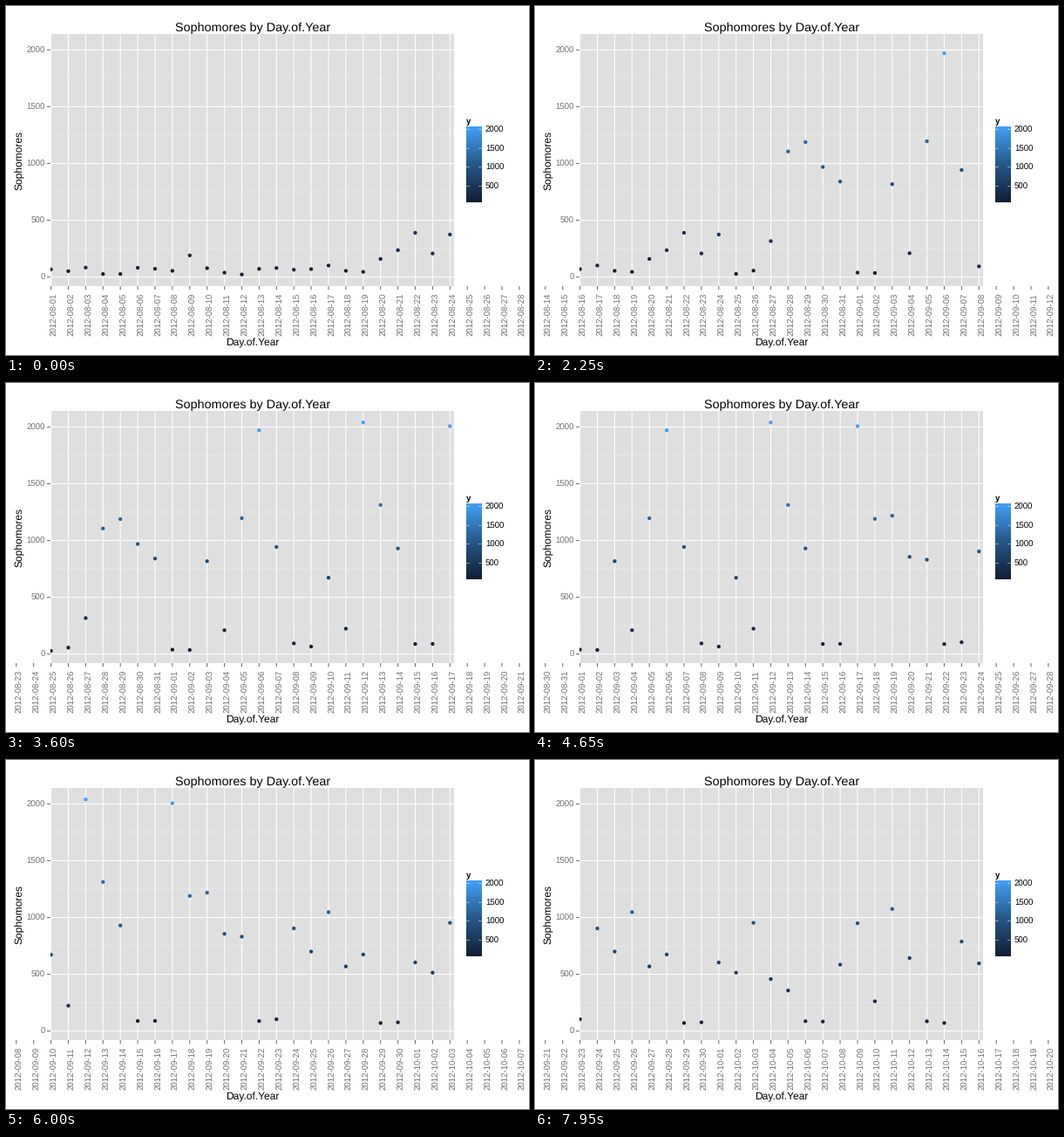
Write a matplotlib script that moves like this. It is 600 px wide and 400 px high and loops after 8000 ms.

```python
import numpy as np
import matplotlib.pyplot as plt
from matplotlib.animation import FuncAnimation
from matplotlib.colors import LinearSegmentedColormap
from matplotlib.patches import Rectangle

plt.rcParams.update({"font.family": "Liberation Sans", "text.hinting": "none"})

DPI = 100
PT = 72 / DPI  # points per pixel
WINDOW, BEFORE, AFTER = 24, 2, 4  # days in the panel, and labels outside it
LEFT, RIGHT, TOP, BOTTOM = 51.3, 514, 32, 321
X0, DAY = 51.6, 19.9
Y0, UNIT = 310.7, 0.1302
INTERVAL, HOLD, FRAMES = 50, 3, 160
GREY = "#707070"

START = np.datetime64("2012-08-01")
COUNTS = np.array([
    68, 52, 84, 27, 27, 82, 73, 55, 191, 78, 39, 23, 72, 80, 65, 70,
    102, 55, 46, 160, 237, 390, 208, 375, 28, 57, 317, 1106, 1188, 969, 841,
    39, 36, 818, 210, 1196, 1970, 943, 94, 66, 672, 224, 2039, 1313, 930,
    89, 90, 2006, 1190, 1218, 856, 831, 88, 104, 904, 700, 1047, 569, 674, 71,
    77, 604, 514, 953, 458, 357, 87, 84, 585, 949, 262, 1075, 643, 86, 71,
    788, 596])

blues = LinearSegmentedColormap.from_list(
    "blues", [np.array(c) / 255 for c in
              [(17, 30, 51), (38, 88, 138), (67, 160, 247)]])

fig = plt.figure(figsize=(6, 4), dpi=DPI, facecolor="white")
ax = fig.add_axes([0, 0, 1, 1])
ax.axis("off")


def x_of(day):
    return X0 + DAY * day


def y_of(count):
    return Y0 - UNIT * count


def line(xs, ys, color, width=1.07, **kw):
    return ax.plot(xs, ys, color=color, lw=width * PT, snap=False,
                   solid_capstyle="butt", **kw)[0]


def label(x, y, text, size=9.6, color="black", **kw):
    return ax.text(x, y, text, fontsize=size * PT, color=color,
                   va="baseline", rotation_mode="anchor", **kw)


# Panel and grid
panel = ax.add_patch(Rectangle((LEFT, TOP), RIGHT - LEFT, BOTTOM - TOP,
                               fc="#dfdfdf", lw=0))
for count in range(250, 2000, 500):
    line([LEFT, RIGHT], [y_of(count)] * 2, "#efefef", 0.54, zorder=2)
for count in range(0, 2001, 500):
    y = y_of(count)
    line([LEFT, RIGHT], [y, y], "white", zorder=2)
    line([LEFT - 4.3, LEFT], [y, y], GREY)
    label(44.5, y + 3.4, str(count), color=GREY, ha="right")
for day in range(WINDOW):
    line([x_of(day)] * 2, [TOP, BOTTOM], "white", zorder=2,
         clip_path=panel)

# Titles
label(282.7, 28.6, "Sophomores by Day.of.Year", 14.4, ha="center")
label(282.7, 390, "Day.of.Year", 12, ha="center")
label(19.3, 176.7, "Sophomores", 12, ha="center", rotation=90)

# Colour legend
label(528, 135, "y", weight="bold")
ax.imshow(np.linspace(1, 0, 256)[:, None], cmap=blues, aspect="auto",
          extent=(528.3, 545.6, 225.3, 138.8), zorder=2)
for count in range(500, 2001, 500):
    y = 227.8 - 0.0431 * count
    line([528.3, 531.8], [y, y], "white", 0.5, zorder=3)
    line([542.1, 545.6], [y, y], "white", 0.5, zorder=3)
    label(550, y + 3.4, str(count))

# Moving parts
slots = np.arange(-BEFORE, WINDOW + AFTER)
ticks = [line([x_of(k)] * 2, [BOTTOM, BOTTOM + 4.3], GREY) for k in slots]
dates = [label(x_of(k) + 7, 378, "", color=GREY, rotation=90) for k in slots]
dots = ax.scatter(x_of(np.arange(WINDOW)), np.zeros(WINDOW),
                  c=np.zeros(WINDOW), s=(4.3 * PT) ** 2, lw=0, cmap=blues,
                  vmin=COUNTS.min(), vmax=COUNTS.max(), zorder=4)
dots.set_clip_path(panel)

ax.set(xlim=(0, 600), ylim=(400, 0))


def update(frame):
    first = frame // HOLD
    counts = COUNTS[first:first + WINDOW]
    dots.set_offsets(np.column_stack([x_of(np.arange(WINDOW)), y_of(counts)]))
    dots.set_array(counts)
    for k, tick, date in zip(slots, ticks, dates):
        day = first + int(k)
        tick.set_visible(day >= 0)
        date.set_text(str(START + day) if day >= 0 else "")
    return [dots, *ticks, *dates]


anim = FuncAnimation(fig, update, frames=FRAMES, interval=INTERVAL,
                     repeat=True, repeat_delay=0)
plt.show()
```
